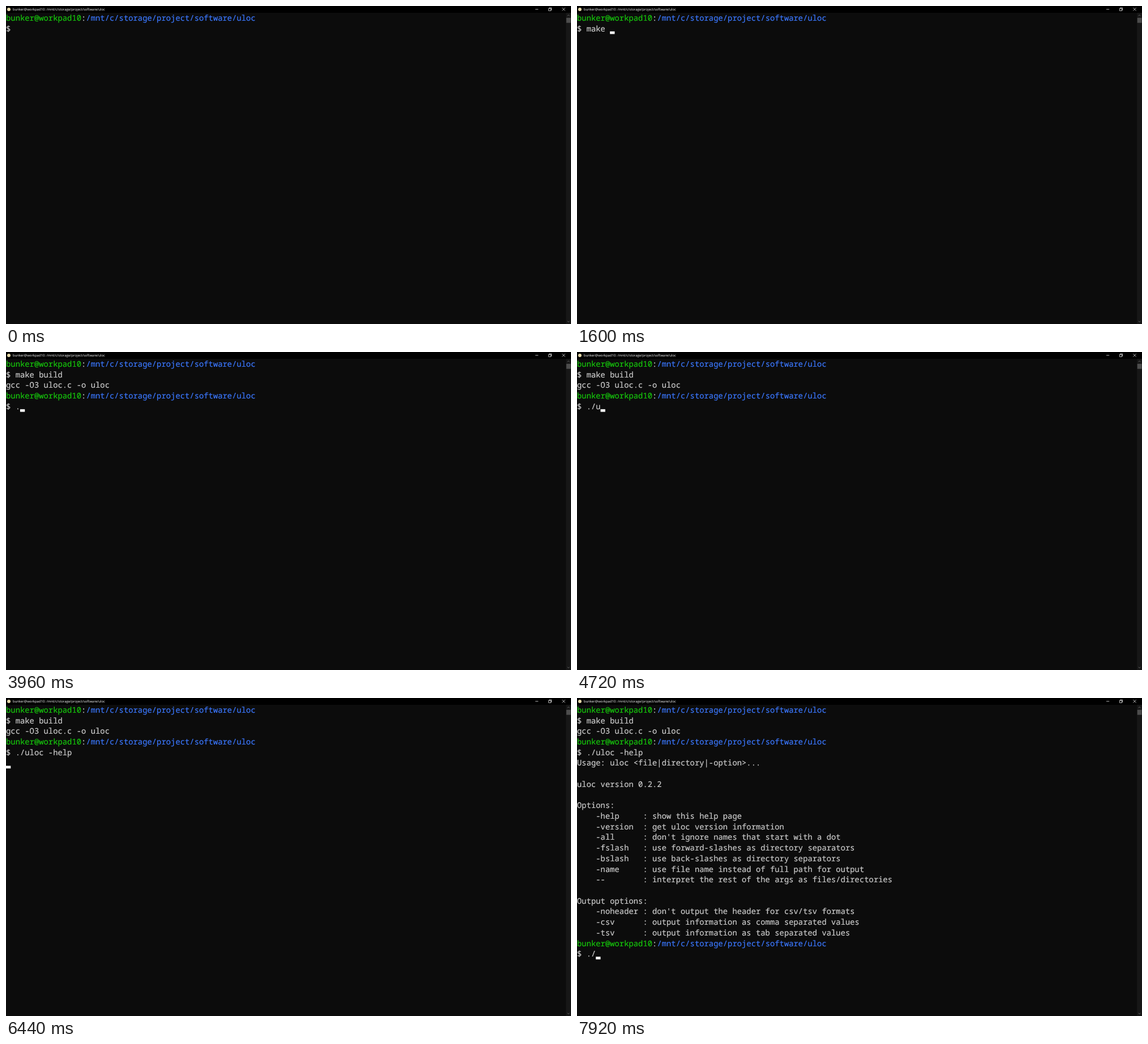
An HTML page that plays this animation: 998x561 px, repeating every 8 s.

```html
<!DOCTYPE html>
<html lang="en">
<head>
<meta charset="utf-8">
<title>Terminal</title>
<style>
  html, body { margin: 0; width: 100%; height: 100%; overflow: hidden; background: #0c0c0c; }
  svg, pre { position: absolute; left: 0; top: 0; }
  pre {
    top: 12.8px; margin: 0; color: #ccc;
    font: 13.861px/18.7125px "Noto Sans Mono", monospace;
    text-rendering: geometricPrecision;
    -webkit-text-stroke: 0.2px currentColor;
  }
  .user { color: #16c60c; }
  .path { color: #3b78ff; }
</style>
</head>
<body>
<svg width="998" height="561" viewBox="0 0 998 561" fill="none">
  <path fill="#000" d="M0 0H998V12H0z"/>
  <circle cx="5" cy="6" r="3" fill="#e6d9a8"/>
  <text id="title" x="12" y="8.1" fill="#fff" font-family="Open Sans, sans-serif" font-size="5.97"
    text-rendering="geometricPrecision"></text>
  <path stroke="#fff" stroke-width=".7" d="M935 5.9h5.2 M958.4 4.4h4v4h-4z M959.5 4.2v-1h4v4h-1 M982.4 3.2l5.2 5.2m0-5.2l-5.2 5.2"/>
  <path fill="#171717" d="M989.2 12H998V561H989.2z"/>
  <path fill="#4d4d4d" d="M989.7 20.8H997.5V29.7H989.7z"/>
  <path stroke="#777" stroke-width=".8" d="M991.7 17.5l1.8-1.8 1.8 1.8 M991.7 555.7l1.8 1.8 1.8-1.8"/>
  <rect id="cursor" width="8.317" height="4.7" fill="#fff"/>
</svg>
<pre id="screen"></pre>
<script>
const LOOP = 8000, CELL_W = 8.3167, CELL_H = 18.7125, TOP = 12;
const user = 'bunker@workpad10', path = '/mnt/c/storage/project/software/uloc';
const prompt = `<span class="user">${user}</span>:<span class="path">${path}</span>\n$ `;
const help = `Usage: uloc &lt;file|directory|-option>...

uloc version 0.2.2

Options:
    -help     : show this help page
    -version  : get uloc version information
    -all      : don't ignore names that start with a dot
    -fslash   : use forward-slashes as directory separators
    -bslash   : use back-slashes as directory separators
    -name     : use file name instead of full path for output
    --        : interpret the rest of the args as files/directories

Output options:
    -noheader : don't output the header for csv/tsv formats
    -csv      : output information as comma separated values
    -tsv      : output information as tab separated values
`;

const screen = document.getElementById('screen');
const cursor = document.getElementById('cursor');
document.getElementById('title').textContent = `${user}: ${path}`;

// Each step holds the whole screen text and the cursor state from a given time on.
const steps = [];
let text = '';
function print(at, added, cursorOn = true) {
  text += added;
  steps.push({ at, text, cursorOn });
}
function type(from, to, word) {
  [...word].forEach((char, i) => print(from + (to - from) * i / (word.length - 1), char));
}

print(0, prompt, false);
print(360, '');
print(900, '', false);
type(1060, 1600, 'make ');
type(1760, 1900, 'bu');
type(1960, 2200, 'ild');
print(2460, '\n');
print(2540, 'gcc -O3 uloc.c -o uloc\n');
print(3140, prompt);
type(3960, 4180, './');
type(4560, 5560, 'uloc -h');
type(5760, 6120, 'elp');
print(6440, '\n');
print(6460, help + prompt);
print(7260, '', false);
type(7680, 7920, './');

let shown;
function draw() {
  const time = performance.now() % LOOP;
  const step = steps.findLast(s => s.at <= time);
  if (step !== shown) {
    shown = step;
    const lines = step.text.split('\n');
    screen.innerHTML = step.text;
    cursor.setAttribute('x', lines.at(-1).length * CELL_W);
    cursor.setAttribute('y', TOP + (lines.length - 0.25) * CELL_H);
    cursor.setAttribute('visibility', step.cursorOn ? 'visible' : 'hidden');
  }
  requestAnimationFrame(draw);
}
draw();
</script>
</body>
</html>
```
